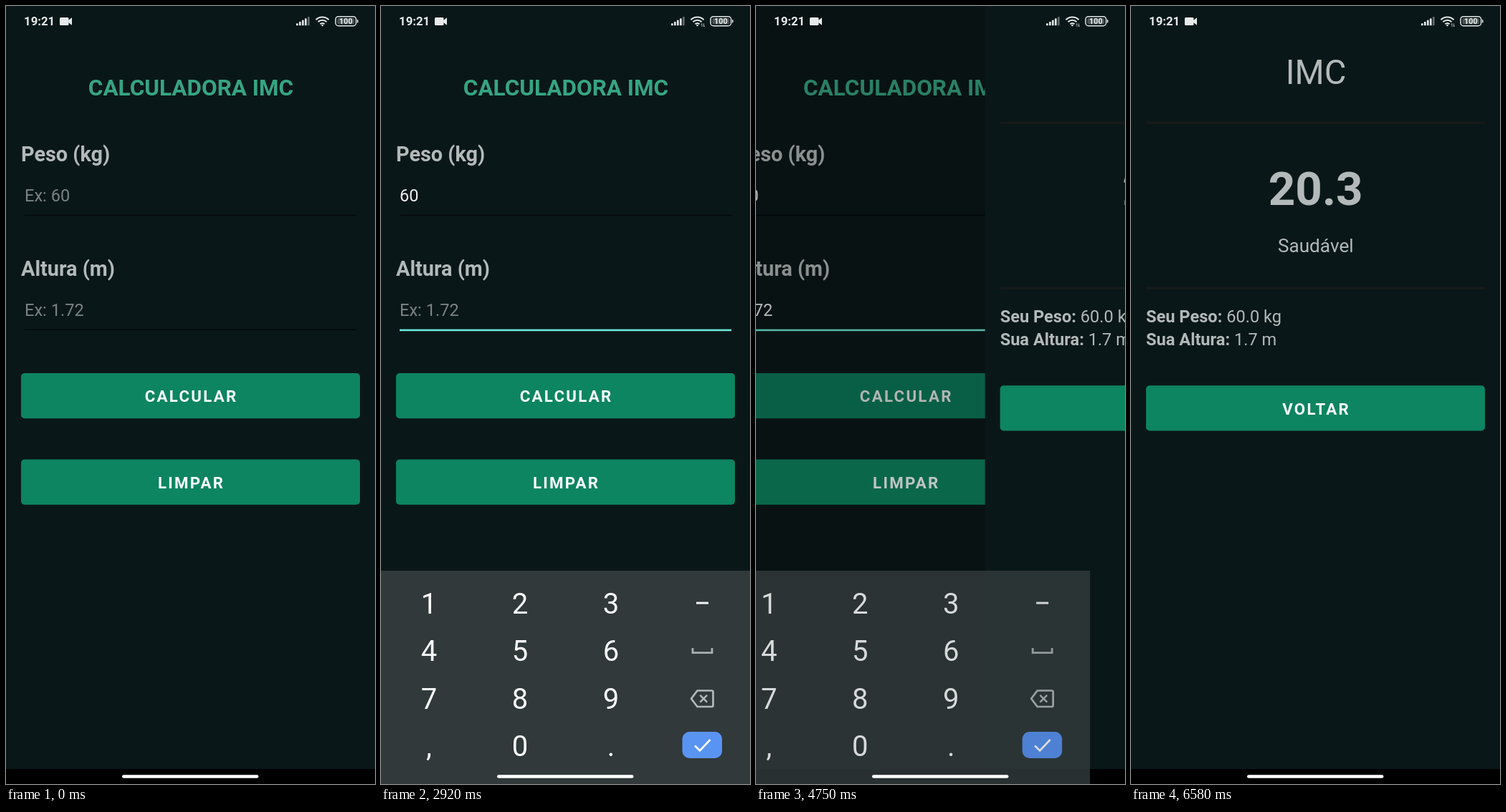
Write an HTML page that moves like this. It is 515x1087 px and loops after 7.33 s.

```html
<!DOCTYPE html>
<html lang="pt">
<head>
<meta charset="utf-8">
<title>Calculadora IMC</title>
<style>
  html, body { margin: 0; width: 100%; height: 100%; overflow: hidden; background: #000; }
  svg { display: block; width: 100vw; height: 100vh; }
  text { font-family: Roboto, "Liberation Sans", sans-serif; white-space: pre; }
  .mid { text-anchor: middle; }
  .bold { font-weight: 700; }
  .title { font-size: 31.47px; fill: #36a581; }
  .label { font-size: 28.85px; fill: #b3b9b9; }
  .field { font-size: 23.6px; }
  .info { font-size: 23.6px; fill: #b3b9b9; }
  .btn { font-size: 22.3px; letter-spacing: 2.25px; fill: #fafdfc; }
  .key { font-size: 40px; fill: #fafbfb; }
</style>
</head>
<body>
<svg viewBox="0 0 515 1087" preserveAspectRatio="none">
  <rect width="515" height="1087" fill="#000"/>
  <g id="form"></g>
  <g id="result"></g>
  <g id="keyboard"></g>
  <g id="status"></g>
</svg>
<script>
const LOOP = 7330, FPS = 12;
const BG = '#0a1718', GREEN = '#0d8560', LINE = '#020909', ACTIVE = '#6cead7';
const HINT = '#7b8384', TYPED = '#eef1f1';
const $ = id => document.getElementById(id);

const rect = (x, y, w, h, fill, extra = '') =>
  `<rect x="${x}" y="${y}" width="${w}" height="${h}" fill="${fill}" ${extra}/>`;
const text = (x, y, cls, str, extra = '') =>
  `<text x="${x}" y="${y}" class="${cls}" ${extra}>${str}</text>`;
const path = (d, stroke, width, extra = '') =>
  `<path d="${d}" fill="none" stroke="${stroke}" stroke-width="${width}" ${extra}/>`;
const button = (y, str) =>
  rect(21, y, 473, 63.3, GREEN, 'rx="5"') + text(258.6, y + 40.4, 'btn bold mid', str);
const field = (id, y, label) =>
  text(21, y, 'label bold', label) +
  text(26, y + 55.8, 'field', '', `id="${id}Text"`) +
  rect(26, y + 74.6, 463, 1.3, LINE, `id="${id}Line"`) +
  rect(26, y + 30, 2.8, 32, '#10c7ab', `id="${id}Caret"`);

$('form').innerHTML =
  rect(0, 0, 515, 1066, BG) +
  text(258, 125.2, 'title bold mid', 'CALCULADORA IMC') +
  field('weight', 217.2, 'Peso (kg)') +
  field('height', 377, 'Altura (m)') +
  button(513, 'CALCULAR') +
  rect(21, 513, 473, 63.3, '#000', 'rx="5" id="press" opacity=".08"') +
  button(633.5, 'LIMPAR') +
  rect(0, 0, 515, 1087, '#000', 'id="dim"');

$('result').innerHTML =
  rect(0, 0, 515, 1066, BG) + rect(0, 1066, 515, 21, '#000') +
  text(258, 108.6, 'mid', 'IMC', 'font-size="47.2" fill="#b3b9b9"') +
  rect(21, 161.7, 473, 3, '#171b1a') +
  text(257.7, 277.5, 'bold mid', '20.3', 'font-size="65.6" fill="#b3b9b9"') +
  text(257.8, 343.6, 'mid', 'Saudável', 'font-size="26.2" fill="#b3b9b9"') +
  rect(21, 392.7, 473, 3, '#171b1a') +
  text(21, 442, 'info', '<tspan class="bold">Seu Peso:</tspan> 60.0 kg') +
  text(21, 474, 'info', '<tspan class="bold">Sua Altura:</tspan> 1.7 m') +
  button(530.2, 'VOLTAR');

// Number pad: rows of three keys, plus a column of symbols
const PAD = ['123', '456', '789', ',0.'];
const keyX = c => 67 + c * 127, keyY = r => 834.5 + r * 66.4;
$('keyboard').innerHTML =
  rect(0, 789, 515, 298, '#31393b') +
  rect(0, 0, 127, 64, '#4a5254', 'rx="5" id="hit"') +
  PAD.map((row, r) => [...row].map((ch, c) =>
    text(keyX(c), keyY(r) + 14.3, 'key mid', ch)).join('')).join('') +
  rect(440, 832.6, 17, 3, '#f4f6f6') +
  path('M435 897v6.6h27v-6.6', '#a9b0b1', 2.8) +
  path('M441.5 956.5h20a2 2 0 0 1 2 2v18.500a2 2 0 0 1-2 2h-20l-8.500-11.300z', '#b3b9ba', 2.7, 'stroke-linejoin="round"') +
  path('M445.300 962.800l9.800 9.800m0-9.800l-9.800 9.800', '#b3b9ba', 2.5) +
  rect(420.5, 1014, 55.5, 37, '#5a94f3', 'rx="10"') +
  path('M434.500 1032.500h21.500m-7.500-8l8 8l-8 8M461 1023.500v18', '#fff', 2.6, 'id="nextIcon"') +
  path('M438 1033.500l7 7l14.500-15.500', '#fff', 2.6, 'id="doneIcon"');

const bars = [0, 1, 2, 3, 4].map(i =>
  rect(405 + i * 4, 24.3 - i * 2.3, 2.7, 2.9 + i * 2.3, '#e2e6e6', i == 4 ? 'opacity=".4"' : '')).join('');
$('status').innerHTML =
  text(25, 27.4, '', '19:21', 'font-size="16.800" font-weight="600" fill="#e6eaea"') +
  rect(75, 16, 12.5, 11, '#e6eaea', 'rx="1.500"') +
  '<path d="M86.500 20.500L92 16.300V26.700L86.500 22.500z" fill="#e6eaea"/>' +
  bars +
  path('M432.500 19.200a13 13 0 0 1 18 0M435.500 22.300a8.600 8.600 0 0 1 12 0M438.500 25.200a4.200 4.200 0 0 1 6 0', '#e2e6e6', 2) +
  '<circle cx="441.500" cy="27" r="1.300" fill="#e2e6e6"/>' +
  path('M448 29v-4.500m-1.200 1.500l1.200-1.500M450.500 24.500v4.500m1.200-1.500l-1.200 1.500', '#cfd5d5', .8, 'id="traffic"') +
  rect(460, 14.7, 28.6, 13, 'none', 'rx="4" stroke="#dfe4e4" stroke-width="1.500"') +
  rect(462.3, 17, 24, 8.4, '#495354', 'rx="2"') +
  rect(489.9, 19, 1.6, 4.5, '#dfe4e4', 'rx=".8"') +
  text(474.3, 25.1, 'bold mid', '100', 'font-size="10.800" fill="#f2f5f5"') +
  rect(162, 1074.2, 190.5, 4.6, '#fff', 'rx="2.300"');

// [time, text]
const WEIGHT = [[0, ''], [1920, '6'], [2080, '60']];
const HEIGHT = [[0, ''], [3080, '1'], [3580, '1.'], [3750, '1.7'], [3920, '1.72']];
// [from, to, row, column]
const HITS = [[1750, 1920, 1, 2], [3000, 3170, 0, 0], [3500, 3670, 3, 2], [3670, 3830, 2, 0], [3830, 4000, 0, 1]];
const FOCUS = 1170, NEXT = 2420, SUBMIT = 4500;
const CARETS = {
  weight: [[FOCUS, 1670], [1920, NEXT]],
  height: [[NEXT, 2920], [3080, SUBMIT]]
};

const within = (t, a, b) => t >= a && t < b;
const last = (steps, t) => steps.filter(s => t >= s[0]).pop()[1];
const show = (id, on) => $(id).setAttribute('display', on ? 'inline' : 'none');
const set = (id, attrs) => { for (const k in attrs) $(id).setAttribute(k, attrs[k]); };
const easeOut = (t, start, length) => {
  const u = Math.min(1, Math.max(0, (t - start) / length));
  return 1 - (1 - u) ** 3;
};

function drawField(id, t, steps, hint, y, focused) {
  const value = last(steps, t);
  $(id + 'Text').textContent = value || hint;
  set(id + 'Text', { fill: value ? TYPED : HINT });
  set(id + 'Line', { y, height: focused ? 2.6 : 1.3, fill: focused ? ACTIVE : LINE });
  const width = [...value].reduce((w, ch) => w + (ch == '.' ? 6.2 : 13.25), 0);
  set(id + 'Caret', { x: 26 + width });
  show(id + 'Caret', CARETS[id].some(c => within(t, ...c)));
}

function draw(now) {
  const clock = Math.floor((now % LOOP + 5) * FPS / 1000) * 1000 / FPS;
  const t = clock + 5;

  drawField('weight', t, WEIGHT, 'Ex: 60', 291.8, within(t, FOCUS, NEXT));
  drawField('height', t, HEIGHT, 'Ex: 1.72', 451.6, t >= NEXT);

  const hit = HITS.find(h => within(t, h[0], h[1]));
  show('hit', hit);
  if (hit) set('hit', { x: keyX(hit[3]) - 64, y: keyY(hit[2]) - 32 });
  show('nextIcon', t < NEXT);
  show('doneIcon', t >= NEXT);
  show('traffic', t >= 500);
  show('press', t >= SUBMIT);

  const rise = easeOut(clock, 1200, 330);
  const slide = clock > 5160 ? 1 : easeOut(clock, 4676.5, 500);
  const shift = -slide * 515 / 4;
  set('form', { transform: `translate(${shift} 0)` });
  set('dim', { opacity: slide * .6 });
  set('result', { transform: `translate(${515 * (1 - slide)} 0)` });
  show('result', slide > 0);
  set('keyboard', {
    transform: `translate(${shift} ${298 * (1 - rise)})`,
    opacity: 1 - slide * slide
  });
  show('keyboard', rise > 0 && slide < 1);
}

function tick() {
  draw(performance.now());
  requestAnimationFrame(tick);
}
tick();
</script>
</body>
</html>
```
